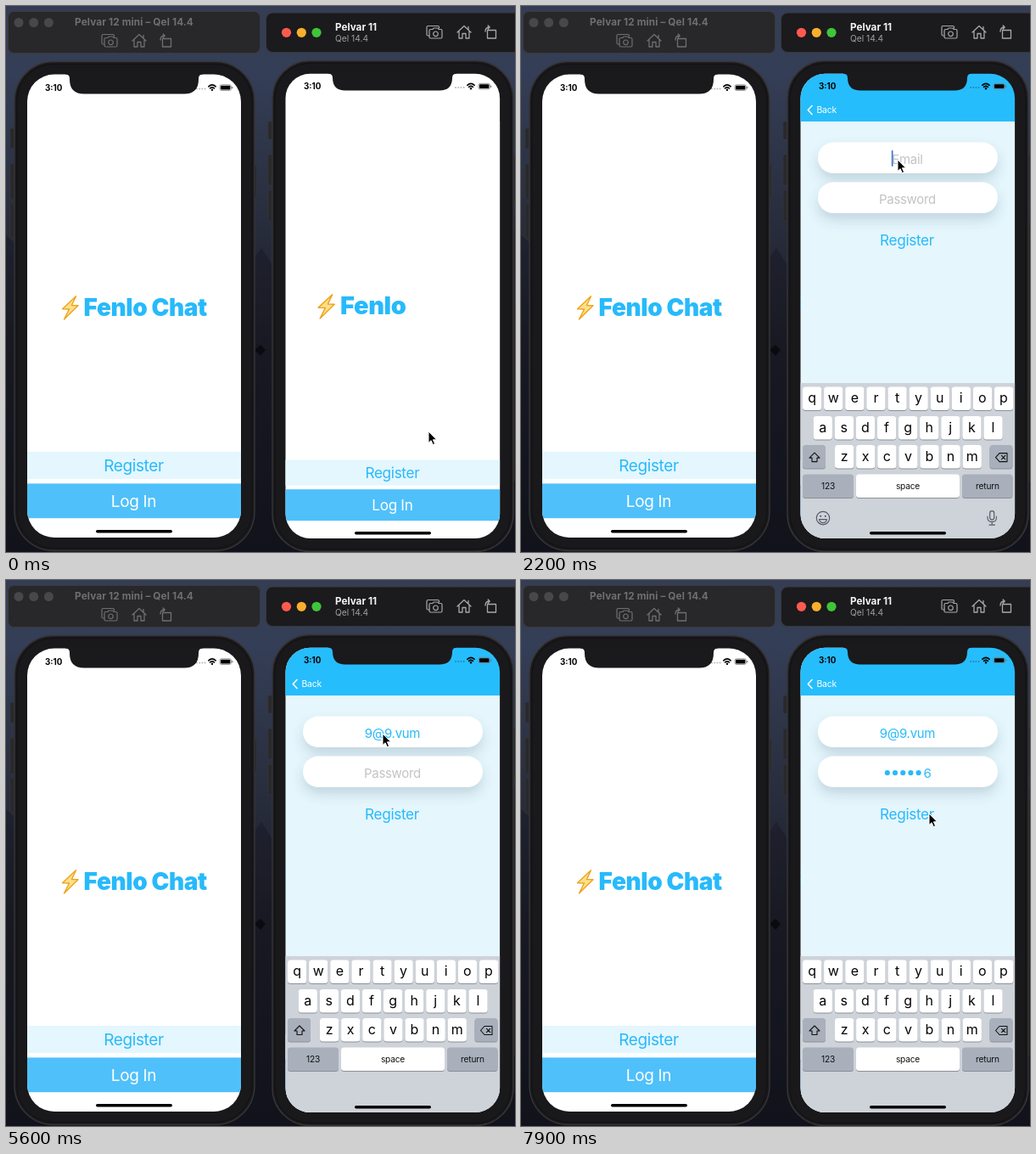
Animation of 600 by 643 pixels, one loop 8 s. Source, as an HTML page:

```html
<!DOCTYPE html>
<html lang="en">
<head>
<meta charset="utf-8">
<title>Two phones, sign-up demo</title>
<style>
html, body { margin: 0; width: 100%; height: 100%; overflow: hidden; background: #10141f; }
svg { display: block; width: 100vw; height: 100vh; font-family: Inter, "Liberation Sans", sans-serif; }
.mid { text-anchor: middle; }
</style>
</head>
<body>
<svg id="stage" viewBox="0 0 600 643"></svg>
<script>
const BLUE = '#27bafb', LOOP = 8000;
const BRAND = 'Fenlo Chat', EMAIL = '9@9.vum';

const rect = (x, y, w, h, fill, r = 0, more = '') =>
  `<rect x="${x}" y="${y}" width="${w}" height="${h}" rx="${r}" fill="${fill}" ${more}/>`;
const text = (x, y, size, fill, str, more = '') =>
  `<text x="${x}" y="${y}" font-size="${size}" fill="${fill}" xml:space="preserve" ${more}>${str}</text>`;
const label = (x, y, size, fill, str, more = '') =>
  text(x, y, size, fill, str, `class="mid" letter-spacing="${(-size * .02).toFixed(2)}" ${more}`);
const circle = (x, y, r, fill, more = '') => `<circle cx="${x}" cy="${y}" r="${r}" fill="${fill}" ${more}/>`;
const line = (d, color, width = 1.2, fill = 'none') =>
  `<path d="${d}" stroke="${color}" stroke-width="${width}" fill="${fill}" stroke-linejoin="round" stroke-linecap="round"/>`;
const at = (x, y, body, id = '') => `<g ${id && `id="${id}"`} transform="translate(${x} ${y})">${body}</g>`;

const cameraIcon = (x, y, c) => at(x, y,
  line('M-6 4H-7.5Q-9 4-9 2.5V-6Q-9-7.5-7.5-7.5H4Q5.5-7.5 5.5-6V-5', c) +
  line('M-6-2Q-6-3.5-4.5-3.5H-2L-1-5H4L5-3.5H7.5Q9-3.5 9-2V5.5Q9 7 7.5 7H-4.5Q-6 7-6 5.5Z', c) +
  circle(1.5, 1.8, 2.8, 'none', `stroke="${c}" stroke-width="1.2"`));
const homeIcon = (x, y, c) => at(x, y,
  line('M-8 0L0-7.5L8 0M5-3V-6.5M-6-1.5V7H-2V1.5H2V7H6V-1.5', c, 1.3));
const rotateIcon = (x, y, c) => at(x, y,
  line('M-4.5-2.5H5.5V7H-4.5ZM-7-1Q-7-6-2-6M-3.8-8L-1.8-6L-3.8-4', c, 1.3));
const windowIcons = (xs, y, c) =>
  cameraIcon(xs[0], y, c) + homeIcon(xs[1], y, c) + rotateIcon(xs[2], y, c);

const bolt = (x, y, s = 1) =>
  `<path transform="translate(${x} ${y}) scale(${s})" d="M17 .8L1 15.8L9 16L3 28L19.5 11.8L12 11.5Z"
    fill="#fde08a" stroke="#efa31c" stroke-width="1.4" stroke-linejoin="round"/>`;

function phoneBody(x, y, w, h, r, buttons) {
  return buttons.map(([bx, by, bh]) => rect(bx, by, 5, bh, '#29282b', 1.5, 'stroke="#38373a" stroke-width=".7"')).join('') +
    rect(x, y, w, h, '#1a191b', r, 'stroke="#363538" stroke-width="1.4"') +
    rect(x + 3, y + 3, w - 6, h - 6, '#19181a', r - 3, 'stroke="#111012" stroke-width="1"');
}

function notch(x1, x2, y, h, r) {
  return `<path fill="#1a191b" d="M${x1 - 5} ${y - 2}V${y}Q${x1} ${y} ${x1} ${y + 5}
    V${y + h - r}Q${x1} ${y + h} ${x1 + r} ${y + h}H${x2 - r}Q${x2} ${y + h} ${x2} ${y + h - r}
    V${y + 5}Q${x2} ${y} ${x2 + 5} ${y}V${y - 2}Z"/>`;
}

function statusBar(timeX, rightX, y) {
  let dots = '';
  for (let i = 0; i < 4; i++) dots += circle(rightX - 42 + i * 3.2, y + 1.5, 1, '#000', 'opacity=".28"');
  const wifi = at(rightX - 24, y + 3,
    line('M-4.2-4.2Q0-8 4.2-4.2M-2.4-2.1Q0-4.2 2.4-2.1', '#000', 1.6) + circle(0, -.2, 1.2, '#000'));
  return text(timeX, y + 3.6, 9.8, '#000', '3:10', 'font-weight="700"') + dots + wifi +
    rect(rightX - 15, y - 3.2, 13.4, 6.6, 'none', 2, 'stroke="#777" stroke-width=".8"') +
    rect(rightX - 14, y - 2.2, 11.4, 4.6, '#000', 1) + rect(rightX - .8, y - 1, 1.2, 2.4, '#777', .6);
}

function welcome(x, title, reg, log, size, ids) {
  const mid = x + 125.4;
  return rect(x - 1, 78, 254, 550, '#fff') +
    bolt(title.bolt, title.y - 24, title.size / 28) +
    text(title.x, title.y, title.size, BLUE, BRAND, `font-weight="900" letter-spacing="-.4" ${ids ? 'id="brand"' : ''}`) +
    rect(x - 1, reg.y, 254, reg.h, '#e4f6fe') +
    label(mid, reg.base, size, BLUE, 'Register', ids ? 'id="openRegister"' : '') +
    rect(x - 1, log.y, 254, log.h, '#4fc0fa') +
    label(mid, log.base, size, '#fff', 'Log In');
}

function form() {
  const field = y => rect(350, y, 212, 36.5, '#fff', 18.2, 'filter="url(#soft)"');
  return rect(330, 136, 254, 492, '#e5f6fd') + field(160.5) + field(207.5) +
    label(455.5, 186, 15, '#c2c3c6', 'Email', 'id="emailHint"') +
    label(455.5, 232.5, 15, '#c2c3c6', 'Password', 'id="passHint"') +
    label(455.5, 186, 15, BLUE, '', 'id="email"') + '<g id="pass"></g>' +
    rect(0, 170, 1.7, 19, '#3c74cf', .8, 'id="caret"') +
    label(455, 282, 17.2, BLUE, 'Register');
}

function keyboard() {
  const key = (x, y, w, fill, h = 27.5) => rect(x, y + 1, w, h, '#8c9097', 3.5) + rect(x, y, w, h, fill, 3.5);
  const row = (letters, x, y) => [...letters].map((c, i) =>
    key(x + i * 25.1, y, 22.3, '#fff') +
    text(x + 11.1 + i * 25.1, y + 18.5, 16, '#050505', c, 'class="mid"')).join('');
  const gray = '#a9b0bc';
  return rect(329, 443, 254, 186, '#ced2d9') +
    row('qwertyuiop', 332, 447.5) + row('asdfghjkl', 344.6, 482) + row('zxcvbnm', 370, 516) +
    key(332, 516, 27, gray) + key(552.5, 516, 27, gray) +
    line('M346 525L352 531H349V535.5H343V531H340Z', '#111', 1.1) +
    line('M559.5 530.5L564 525.5H573V535.5H564ZM566.5 528.3L570.8 532.7M570.8 528.3L566.5 532.7', '#111', 1.1) +
    key(332, 550.5, 60, gray) + key(395, 550.5, 122, '#fff') + key(520, 550.5, 59.5, gray) +
    label(362, 568, 10.2, '#111', '123') + label(456, 567.5, 10.2, '#111', 'space') +
    label(550, 567.5, 10.2, '#111', 'return') +
    `<g id="extras">${circle(356, 602, 7.7, 'none', 'stroke="#555b64" stroke-width="1.2"')}
      ${circle(353.2, 599.7, 1.1, '#555b64')}${circle(358.8, 599.7, 1.1, '#555b64')}
      ${line('M351.5 603.5H360.5Q359.5 607.5 356 607.5T351.5 603.5', '#555b64', 1.1)}
      ${rect(552.7, 593.5, 5, 10.5, 'none', 2.5, 'stroke="#555b64" stroke-width="1.2"')}
      ${line('M550 600V602Q550 606.5 555.2 606.5T560.4 602V600M555.2 606.5V610M552 610H558.5', '#555b64', 1.1)}</g>`;
}

const wallpaper = rect(0, 0, 600, 643, 'url(#night)') +
  '<path d="M0 270L14 282L290 300L301 285L314 305L600 260V643H0Z" fill="#12131a" opacity=".35"/>' +
  '<path d="M293 405L300 399L306 405L300 412Z" fill="#0a0b10"/><path d="M597 245H600V560H594Z" fill="#33251f" opacity=".6"/>';

const leftWindow =
  rect(2.5, 6.5, 297, 49, '#282729', 7, 'stroke="#3b3a3d" stroke-width="1"') +
  [15, 32.7, 50.4].map(x => circle(x, 19.5, 5.5, '#48474a')).join('') +
  text(151, 23.3, 11.8, '#6f6e71', 'Pelvar 12 mini – Qel 14.4', 'class="mid" font-weight="700" letter-spacing=".1"') +
  windowIcons([122, 157, 189], 41, '#6f6e71') +
  phoneBody(10, 65.5, 283, 576, 46, [[5, 144, 24], [5, 186, 42], [5, 233, 41], [290.5, 187, 40]]) +
  `<g clip-path="url(#leftScreen)">${welcome(25, { bolt: 65.5, x: 91.5, y: 365, size: 28 },
    { y: 525, h: 32, base: 547.7 }, { y: 562.4, h: 40.8, base: 590 }, 19, false)}
    ${statusBar(46, 267, 96)}</g>` +
  notch(75, 227, 80.5, 23, 17) + rect(106, 617, 90, 3.6, '#000', 1.8);

const rightWindow =
  rect(306.5, 8, 310, 46.5, '#1b1a1c', 8, 'stroke="#39383a" stroke-width="1"') +
  [['#ff5a50', 330.5], ['#f8b02c', 348.3], ['#3fc53a', 366]].map(([c, x]) => circle(x, 31.3, 5.6, c)).join('') +
  text(388, 29.3, 11.7, '#f4f4f4', 'Pelvar 11', 'font-weight="700"') +
  text(388, 42, 10.2, '#a2a1a3', 'Qel 14.4') +
  windowIcons([505, 540, 572], 31, '#a8a7a9') +
  phoneBody(314, 64.5, 284, 578, 44, [[309, 136, 21], [309, 175, 36], [309, 217, 36], [595, 175, 56]]) +
  `<g clip-path="url(#rightScreen)">
    <g id="welcome">${welcome(330, { bolt: 367, x: 394, y: 363, size: 29 },
      { y: 534.5, h: 30, base: 556 }, { y: 569.2, h: 37, base: 594 }, 17.2, true)}</g>
    ${rect(329, 78, 254, 550, '#000', 0, 'id="dim"')}
    <g id="form">${form()}</g>
    <g id="keyboard">${keyboard()}</g>
    <g id="header">${rect(329, 78, 254, 58, '#26bdfc')}
      ${line('M343 117.5L338.3 122.5L343 127.5', '#fff', 1.6)}${text(348.5, 126, 10.4, '#fff', 'Back', 'letter-spacing="-.2"')}</g>
    ${statusBar(351, 572, 94.5)}</g>` +
  notch(385, 526, 79.7, 19.8, 15) + rect(411, 619, 90, 3.4, '#000', 1.7);

const pointer = at(0, 0,
  '<path d="M0 0V13.5L3.1 10.7L5.3 15.6L7.6 14.6L5.4 9.8H9.6Z" fill="#000" stroke="#fff" stroke-width="1" stroke-linejoin="round"/>', 'pointer');

document.getElementById('stage').innerHTML = `<defs>
  <linearGradient id="night" x2="0" y2="1"><stop offset="0" stop-color="#343d53"/>
    <stop offset=".12" stop-color="#343e56"/><stop offset=".38" stop-color="#292e3e"/>
    <stop offset=".62" stop-color="#1b1d27"/><stop offset="1" stop-color="#11131b"/></linearGradient>
  <clipPath id="leftScreen">${rect(25, 80.5, 252, 545.5, '#000', 32)}</clipPath>
  <clipPath id="rightScreen">${rect(329.5, 79.7, 252.6, 547.3, '#000', 29)}</clipPath>
  <filter id="soft" x="-20%" y="-50%" width="140%" height="250%">
    <feDropShadow dx="0" dy="8" stdDeviation="7" flood-color="#3b5866" flood-opacity=".2"/></filter>
  </defs>` + wallpaper + leftWindow + rightWindow + pointer;

const el = {};
document.querySelectorAll('[id]').forEach(node => el[node.id] = node);

const PUSH = 1010, FOCUS = 2000, TAB = 5000;
const emailTimes = [2900, 3350, 3700, 4050, 4350, 4550, 4700];
const passTimes = [0, 1, 2, 3, 4, 5].map(i => 5700 + i * 90);
// Each pointer move: start, end, target
const moves = [[100, 800, 496, 541.5], [1300, 1950, 444, 181], [6800, 7100, 455, 182], [7200, 7750, 481, 275]];

const clamp = v => Math.min(1, Math.max(0, v));
const easeOut = v => 1 - (1 - clamp(v)) ** 3;
const smooth = v => (v = clamp(v), v * v * (3 - 2 * v));
const show = (node, on) => node.setAttribute('visibility', on ? 'visible' : 'hidden');
const shift = (node, x, y) => node.setAttribute('transform', `translate(${x.toFixed(2)} ${y.toFixed(2)})`);
const typed = (times, t) => times.filter(k => k <= t).length;

function drawPassword(count) {
  const left = 456 - ((count - 1) * 9.2 + 9) / 2;
  let out = '';
  for (let i = 0; i < count - 1; i++) out += circle(left + 3.3 + i * 9.2, 227, 3.1, BLUE);
  if (count) out += text(left + (count - 1) * 9.2, 232.5, 15, BLUE, '6');
  el.pass.innerHTML = out;
}

function caretX(inPassword, emailCount, passCount) {
  if (inPassword && passCount) return 456 + ((passCount - 1) * 9.2 + 9) / 2;
  const hint = inPassword ? el.passHint : el.emailHint;
  if (inPassword || !emailCount) return 455 - hint.getComputedTextLength() / 2;
  return 455.5 + el.email.getComputedTextLength() / 2;
}

function render(t) {
  el.brand.textContent = BRAND.slice(0, 5 + Math.floor(t / 100));
  el.openRegister.setAttribute('opacity', t >= 900 ? .4 : 1);

  const push = easeOut((t - PUSH) / 500);
  shift(el.welcome, -75.6 * push, 0);
  shift(el.form, 252 * (1 - push), 0);
  el.dim.setAttribute('opacity', .11 * push);
  show(el.header, t >= 1000);

  shift(el.keyboard, 0, 186 * (1 - easeOut((t - FOCUS) / 245)));
  show(el.extras, t < TAB);

  const emailCount = typed(emailTimes, t), passCount = typed(passTimes, t);
  el.email.textContent = EMAIL.slice(0, emailCount);
  show(el.emailHint, !emailCount);
  show(el.passHint, !passCount);
  drawPassword(passCount);

  const inPassword = t >= TAB;
  const lastInput = Math.max(...[FOCUS, TAB, ...emailTimes, ...passTimes].filter(k => k <= t));
  show(el.caret, t >= FOCUS && (t - lastInput) % 1000 < 500);
  shift(el.caret, caretX(inPassword, emailCount, passCount), inPassword ? 47 : 0);

  let x = 498, y = 501;
  for (const [start, end, tx, ty] of moves) {
    const k = smooth((t - start) / (end - start));
    x += (tx - x) * k;
    y += (ty - y) * k;
  }
  shift(el.pointer, x, y);
}

const begin = performance.now();
function tick() {
  render((performance.now() - begin) % LOOP);
  requestAnimationFrame(tick);
}
tick();
</script>
</body>
</html>
```
